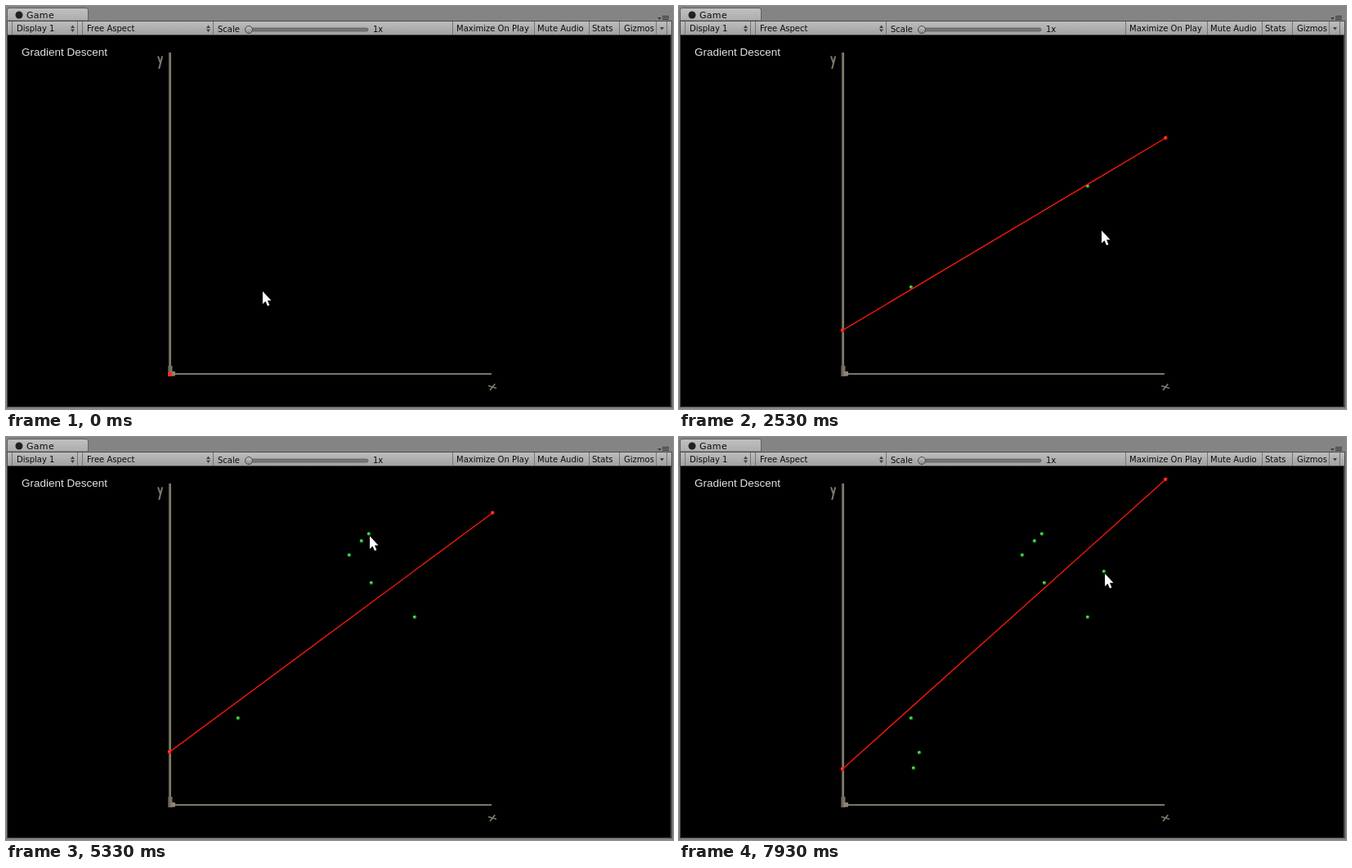
Recreate the animation shown at these times as an HTML page. Size 816x494 px, loop 8000 ms.

```html
<!DOCTYPE html>
<html lang="en">
<head>
<meta charset="utf-8">
<title>Gradient Descent</title>
<style>
html, body { margin: 0; width: 100%; height: 100%; overflow: hidden; background: #848484; }
svg { display: block; width: 816px; height: 494px; }
.ui { font: 10px "DejaVu Sans", sans-serif; fill: #0b0b0b; }
.ui .tab { font-size: 11px; letter-spacing: .3px; }
.title { font: 13.5px "Liberation Sans", Arial, sans-serif; fill: #e2e2e2; }
</style>
</head>
<body>
<svg viewBox="0 0 816 494">
  <defs>
    <linearGradient id="bar" x2="0" y2="1"><stop stop-color="#bdbdbd"/><stop offset="1" stop-color="#a2a2a2"/></linearGradient>
    <linearGradient id="tab" x2="0" y2="1"><stop stop-color="#c0c0c0"/><stop offset="1" stop-color="#adadad"/></linearGradient>
    <linearGradient id="knob" x2="0" y2="1"><stop stop-color="#c4c4c4"/><stop offset="1" stop-color="#8d8d8d"/></linearGradient>
    <radialGradient id="green" cx=".4" cy=".4"><stop stop-color="#8cf08c"/><stop offset=".5" stop-color="#35c035"/><stop offset="1" stop-color="#147014"/></radialGradient>
    <radialGradient id="red" cx=".4" cy=".4"><stop stop-color="#ff7058"/><stop offset=".5" stop-color="#ff2414"/><stop offset="1" stop-color="#d81208"/></radialGradient>
  </defs>

  <rect width="816" height="494" fill="#848484"/>
  <path d="M1.5 18V5q0-2.5 2.5-2.5h94q2.5 0 2.5 2.5v13z" fill="url(#tab)" stroke="#5f5f5f"/>
  <rect x="1" y="18" width="814" height="474" fill="#4a4a4a"/>
  <rect x="2" y="19" width="812" height="16" fill="url(#bar)"/>
  <rect x="2" y="36" width="811" height="455" fill="#000"/>
  <path id="dividers" stroke="#747474"/>
  <circle cx="16" cy="11" r="4.5" fill="#202020"/>
  <path d="M79 27l2.5-3.5 2.5 3.5zm0 1.5l2.5 3.5 2.5-3.5zM245 27l2.5-3.5 2.5 3.5zm0 1.5l2.5 3.5 2.5-3.5zM800 26h5l-2.5 3.5zM797 14h5l-2.5 3z" fill="#404040"/>
  <path d="M803 12.5h8m-8 2h8m-8 2h8" stroke="#333"/>
  <rect x="297" y="27" width="146" height="4" rx="2" fill="#777" stroke="#555" stroke-width=".7"/>
  <circle cx="297" cy="29" r="4.5" fill="url(#knob)" stroke="#484848"/>
  <g class="ui">
    <text class="tab" x="25" y="15">Game</text>
    <text x="13" y="31">Display 1</text>
    <text x="99" y="31">Free Aspect</text>
    <text x="259" y="32">Scale</text>
    <text x="449" y="32">1x</text>
    <text x="551" y="31">Maximize On Play</text>
    <text x="650" y="31">Mute Audio</text>
    <text x="717" y="31">Stats</text>
    <text x="756" y="31">Gizmos</text>
  </g>
  <text class="title" x="19" y="61">Gradient Descent</text>

  <g fill="none">
    <path d="M200.5 57V446" stroke="#6f685c" stroke-width="3"/>
    <path d="M201.5 57V446" stroke="#8b8474"/>
    <path d="M204 451H594" stroke="#7d7668" stroke-width="2"/>
    <path d="M186 61.5L188.7 69.5M191.2 61.5L187.2 77" stroke="#7f786a" stroke-width="2"/>
    <path d="M590 465.5L600 468.5M598.3 463.3L592 471" stroke="#7f786a" stroke-width="1.8"/>
  </g>
  <rect x="198" y="441" width="5.5" height="13" fill="#787164"/>
  <rect x="198" y="441" width="1.5" height="13" fill="#524d44"/>
  <rect x="202" y="448" width="5" height="5.5" fill="#8d8676"/>
  <rect id="start" x="198" y="449" width="5" height="5" fill="#f03020"/>

  <g id="points" fill="url(#green)"></g>
  <g id="fit">
    <line x1="200" x2="595.3" stroke="#f81808" stroke-width="1.4"/>
    <circle cx="200" r="2.4" fill="url(#red)"/>
    <circle cx="595.3" r="2.4" fill="url(#red)"/>
  </g>
  <path id="cursor" d="M0 0V15.5L3.5 12.3 6 18 8.4 17 6 11.3H10.5Z" fill="#fff"/>
</svg>
<script>
const $ = id => document.getElementById(id);
const LOOP = 8000, FRAME = 1000 / 15, ORIGIN = 451;
const MOVE = 500, REST = 100;        // longest pointer move, shortest stop
const LEFT_LAG = 210, RIGHT_LAG = 150; // time constants of the line's ends

// Pointer stops; those with a fit add a point and pull the line's ends to new heights
const stops = [
  { t: 0, x: 313, y: 347 },
  { t: 660, x: 284, y: 344.7, fit: [ORIGIN, ORIGIN] },
  { t: 1250, x: 500, y: 220.8, fit: [397.5, 161.7] },
  { t: 2530, x: 516, y: 272.5 },
  { t: 3667, x: 447, y: 178.8, fit: [387, 131.6] },
  { t: 4600, x: 420, y: 144.8, fit: [386.3, 95.5] },
  { t: 4930, x: 435, y: 127.5, fit: [386.3, 95.5] },
  { t: 5320, x: 444, y: 118.8, fit: [383, 66] },
  { t: 6000, x: 287, y: 405.8, fit: [391.5, 63] },
  { t: 6460, x: 294, y: 386.8, fit: [407, 52] },
  { t: 7800, x: 520, y: 164.8, fit: [407, 52] }
];
const clicks = stops.filter(s => s.fit);
const lineStart = clicks[1].t;

const mix = (a, b, u) => a + (b - a) * u;
const smooth = u => u * u * (3 - 2 * u);
const show = (el, on) => el.setAttribute("visibility", on ? "visible" : "hidden");
function set(el, attrs) {
  for (const name in attrs) el.setAttribute(name, attrs[name]);
}

// Each click makes the end approach its new height exponentially
function endY(side, lag, t) {
  return clicks.filter(c => c.t <= t).reduce(
    (y, c) => mix(y, c.fit[side], 1 - Math.exp((c.t - t) / lag)), ORIGIN);
}

function pointer(t) {
  const i = stops.findLastIndex(s => s.t <= t);
  const a = stops[i], b = stops[i + 1] || { ...a, t: LOOP };
  const move = Math.min(MOVE, b.t - a.t - REST);
  const u = smooth(Math.max(0, 1 - (b.t - t) / move));
  return [mix(a.x, b.x, u) + 1, mix(a.y, b.y, u) + 2.7];
}

set($("dividers"), {
  d: [7, 87, 93, 253, 546, 646, 713, 750, 795, 808].map(x => `M${x + .5} 19v16`).join("")
});
const dots = clicks.map(({ x, y }) => {
  const dot = document.createElementNS("http://www.w3.org/2000/svg", "circle");
  set(dot, { cx: x, cy: y, r: 2.4 });
  return $("points").appendChild(dot);
});
const [line, left, right] = $("fit").children;

function draw(now) {
  // The picture advances 15 times a second
  const t = Math.floor((now % LOOP + 5) / FRAME) * FRAME % LOOP;
  const y1 = endY(0, LEFT_LAG, t), y2 = endY(1, RIGHT_LAG, t);
  set(line, { y1, y2 });
  set(left, { cy: y1 });
  set(right, { cy: y2 });
  show($("fit"), t >= lineStart);
  show($("start"), t < lineStart);
  dots.forEach((dot, i) => show(dot, t >= clicks[i].t - 1));
  set($("cursor"), { transform: `translate(${pointer(t)})` });
}

const begin = performance.now();
function tick() {
  draw(performance.now() - begin);
  requestAnimationFrame(tick);
}
tick();
</script>
</body>
</html>
```
